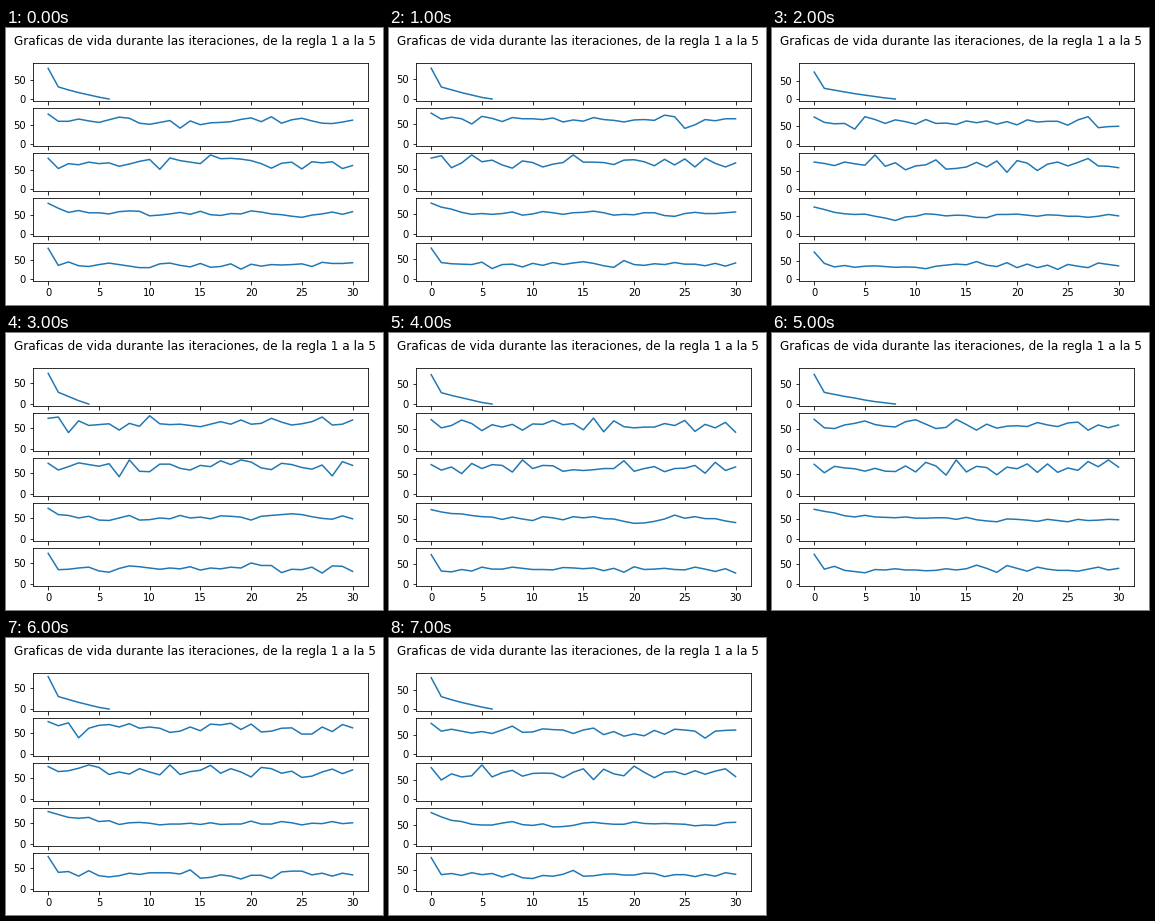
Recreate the animation shown at these times as a matplotlib script. Size 377 by 277 pixels, loop 8000 ms.

```python
import numpy as np
import matplotlib.pyplot as plt
from matplotlib.animation import FuncAnimation

W, H, DPI = 377, 277, 72
LEFT, BOTTOM = 26.95, 24.3
AX_W, AX_H, STEP = 334.8, 37.49, 44.99
STEPS = 30

# Each run: starting population, lifetime under rule 1, highest point of rule 3
RUNS = [
    (81, 6, (16, 90)),
    (77, 6, (14, 85)),
    (76, 8, (6, 96)),
    (73, 4, (19, 81)),
    (75, 6, (9, 87)),
    (74, 8, (14, 85)),
    (78, 6, (4, 82)),
    (81, 6, (5, 88)),
]


def fading(start, life):
    """Sharp first drop, then a slow decline to zero."""
    left = 1 - np.arange(life) / (life - 1)
    return np.append(start, (0.39 * start * left ** 1.2).round())


def wandering(rng, start, mean, pull, noise):
    """Random walk drawn back to a mean."""
    y = [start]
    for _ in range(STEPS):
        y.append(y[-1] + pull * (mean - y[-1]) + rng.normal(0, noise))
    return np.round(y)


def simulate(seed, start, life, peak):
    rng = np.random.default_rng(seed)
    x, top = peak
    rule2 = wandering(rng, start, mean=61, pull=1.1, noise=8).clip(36, 79)
    rule3 = wandering(rng, start, mean=66, pull=1.2, noise=9).clip(41, top)
    rule3[x] = top
    rule4 = wandering(rng, start, mean=52, pull=0.4, noise=4).clip(36, start)
    rule5 = wandering(rng, start, mean=37, pull=1, noise=5).clip(24, start)
    return [fading(start, life), rule2, rule3, rule4, rule5]


plt.rcParams.update({"font.family": "DejaVu Sans", "font.size": 10})
fig = plt.figure(figsize=((W + 0.01) / DPI, (H + 0.01) / DPI), dpi=DPI,
                 facecolor="white")
fig.text(189 / W, 270.24 / H,
         "Graficas de vida durante las iteraciones, de la regla 1 a la 5",
         fontsize=12, ha="center", va="top")

axes, lines = [], []
for row in range(5):
    y0 = BOTTOM + (4 - row) * STEP
    ax = fig.add_axes([LEFT / W, y0 / H, AX_W / W, AX_H / H])
    ax.set_xlim(-0.05 * STEPS, 1.05 * STEPS)
    ax.set_xticks(range(0, STEPS + 1, 5))
    ax.set_yticks([0, 50])
    ax.tick_params(labelbottom=row == 4)
    axes.append(ax)
    lines += ax.plot([], [], color="#1f77b4", lw=1.5)

runs = [simulate(seed, *run) for seed, run in enumerate(RUNS)]


def update(frame):
    curves = runs[frame]
    top = max(c.max() for c in curves)
    for ax, line, curve in zip(axes, lines, curves):
        line.set_data(range(len(curve)), curve)
        ax.set_ylim(-0.05 * top, 1.05 * top)
    return lines


anim = FuncAnimation(fig, update, frames=len(runs), interval=1000,
                     repeat=True, repeat_delay=0)
plt.show()
```
